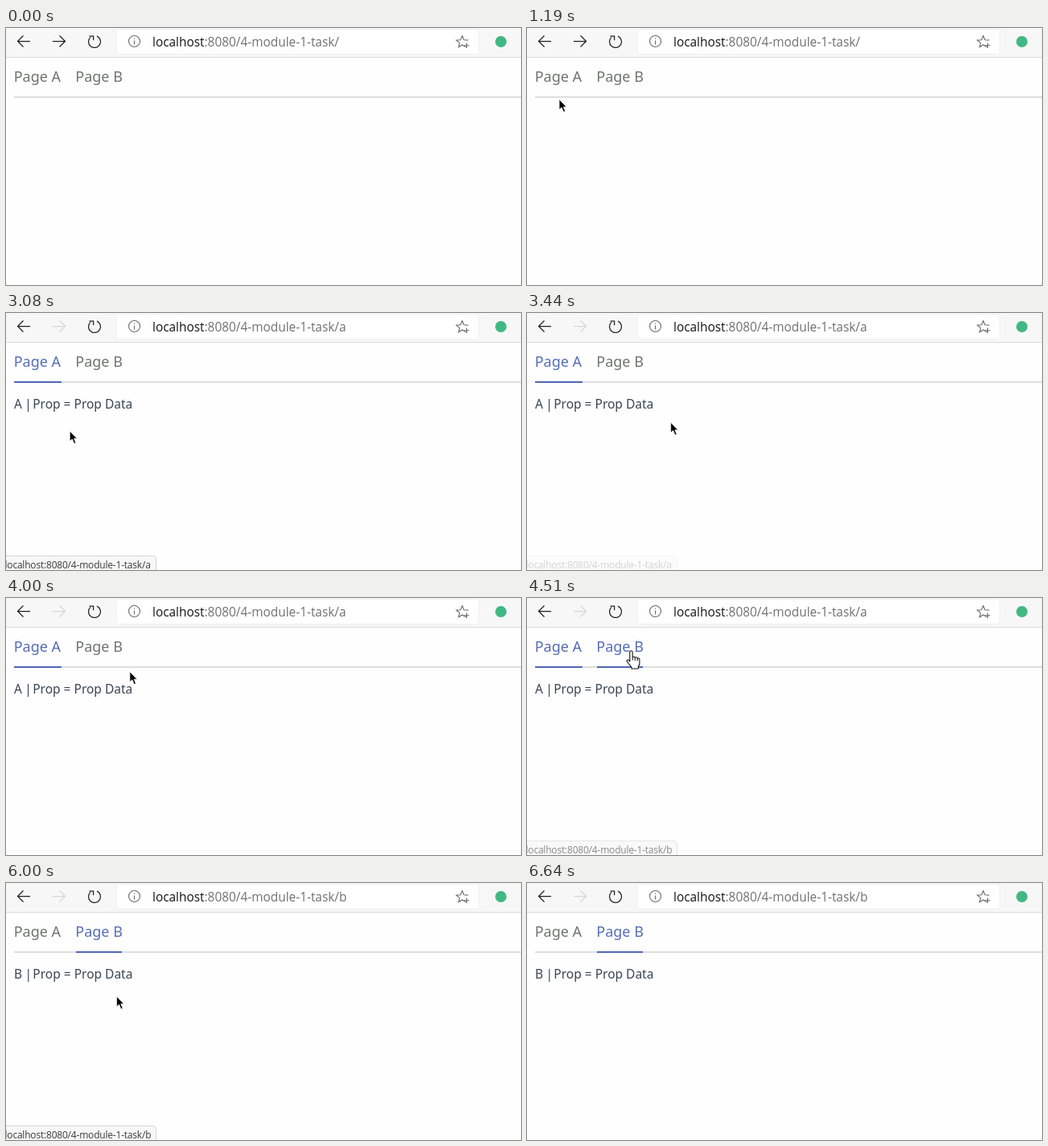
Animation, 640 px wide and 320 px high, one loop 8090 ms. Source, as an HTML page:

```html
<!DOCTYPE html>
<html lang="en">
<head>
<meta charset="utf-8">
<title>Page tabs</title>
<style>
  html, body { margin: 0; width: 100%; height: 100%; overflow: hidden; background: #fefefe; }
  svg { display: block; width: 100%; height: 100%; }
  text { white-space: pre; }
  .url { font: 15.4px "Open Sans", "Noto Sans", sans-serif; fill: #707070; }
  .host { fill: #151515; }
  .nav { font: 18px "Noto Sans", sans-serif; }
  .body { font: 15.5px "Noto Sans", sans-serif; fill: #3a4653; }
  .tip { font: 12px "Open Sans", "Noto Sans", sans-serif; letter-spacing: -.2px; fill: #3c3c3c; }
  .icon { fill: none; stroke: #222; stroke-width: 1.25; }
  .soft { stroke: #6a6a6a; stroke-width: 1.1; }
</style>
</head>
<body>
<svg viewBox="0 0 640 320">
  <rect width="640" height="320" fill="#fefefe"/>

  <!-- toolbar -->
  <rect width="640" height="37" fill="#f7f7f7"/>
  <rect y="36" width="640" height="1" fill="#dadada"/>
  <rect x="137.5" y="1.5" width="450" height="31" rx="3" fill="#fff" stroke="#f0f0f0"/>
  <path class="icon" d="M14.5 16.5H30M21.5 9.5L14.5 16.5L21.5 23.5"/>
  <path class="icon" id="forward" d="M58 16.5H73.5M66.5 9.5L73.5 16.5L66.5 23.5"/>
  <path class="icon" d="M113 10.1A7.5 7.5 0 1 1 105 11.4M103.5 10.2H108.6V15.2"/>
  <circle class="icon soft" cx="159.5" cy="16.5" r="7"/>
  <path class="icon soft" d="M159.5 15.5V20.5M159.5 12.5V13.8"/>
  <path class="icon soft" id="star"/>
  <path class="icon soft" d="M572.5 18.5V25M569.3 21.7H575.7"/>
  <circle cx="615" cy="17" r="7" fill="#41b883"/>
  <text class="url" x="182" y="23"><tspan class="host">localhost</tspan><tspan id="path"></tspan></text>

  <!-- page -->
  <rect x="10" y="85" width="630" height="2" fill="#dedee0"/>
  <text class="nav" id="linkA" x="9.7" y="67">Page A</text>
  <text class="nav" id="linkB" x="86.3" y="67">Page B</text>
  <rect id="lineA" x="10" y="85" width="59" height="2" fill="#4f68b4"/>
  <rect id="lineB" x="87" y="85" width="57" height="2" fill="#4f68b4"/>
  <text class="body" id="content" x="10" y="119"><tspan id="name"></tspan><tspan dx="-.7"> |</tspan><tspan dx="-2.6"> Prop = Prop Data</tspan></text>

  <g id="status">
    <rect x="-5.5" y="302.5" width="192" height="24" rx="4" fill="#f7f7f7" stroke="#d5d5d5"/>
    <text class="tip" id="tip" x="-1.5" y="318"></text>
  </g>

  <circle id="mark" r="11" fill="#fcf53c" opacity=".76"/>
  <g id="cursor">
    <path id="arrow" fill="#000" stroke="#fff" stroke-width=".7"
      d="M0 0V12.6L3 10L5.4 15.6L7.5 14.7L5.2 9.3H9Z"/>
    <path id="hand" fill="#fff" stroke="#111" stroke-width="1.15" stroke-linejoin="round"
      transform="translate(-.7 0) scale(.95)"
      d="M-1.8 2Q-1.8 0 0 0T1.8 2V8.2Q3.6 6.8 5 8.8Q6.9 7.6 8.2 9.8Q11 9 11 12V16.5Q11 18.5 9.3 20.5V23.5H.5V21.5L-5 14.8Q-6.3 12.6-4.8 12T-1.8 14ZM1.8 8.2V12.5M5 8.8V12.8M8.2 9.8V13.2"/>
  </g>
</svg>
<script>
const LOOP = 8090, OPEN_A = 1830, OPEN_B = 5400;
const BLUE = '#566eb6', GREY = '#707470';
const BASE = ':8080/4-module-1-task/';

// time, x, y, easing towards the next point
const moves = [
  [860, -4, 104, 'line'], [1190, 40, 89, 'out'], [1550, 51, 67.5, 'line'],
  [2700, 51, 67.5, 'in'], [3080, 79, 147, 'line'], [3270, 132, 148, 'line'],
  [3490, 192, 133, 'line'], [3540, 192, 133, 'in'], [4000, 154, 92, 'out'],
  [4280, 131, 66, 'line'], [4380, 131, 66, 'line'], [4610, 129.5, 65.5, 'line'],
  [5820, 129.5, 65.5, 'in'], [6230, 157, 324, 'line']
];
// time, opacity of the link hint
const hint = [
  [1680, 0], [1940, 1], [3300, 1], [3480, 0],
  [4380, 0], [4600, 1], [6460, 1], [6640, 0]
];
const ease = {
  line: p => p,
  in: p => Math.pow(p, 1.5),
  out: p => 1 - Math.pow(1 - p, 1.6)
};

const $ = id => document.getElementById(id);
const mix = (a, b, p) => a + (b - a) * p;
const show = (id, on) => $(id).setAttribute('visibility', on ? 'visible' : 'hidden');
const within = (t, from, to) => t >= from && t < to;

function sample(rows, t) {
  const i = rows.findIndex(r => r[0] > t);
  if (i === 0) return rows[0].slice(1);
  if (i < 0) return rows[rows.length - 1].slice(1);
  const a = rows[i - 1], b = rows[i];
  const p = ease[a[3] || 'line']((t - a[0]) / (b[0] - a[0]));
  return [1, 2].map(k => mix(a[k], b[k], p));
}

function drawStar() {
  const points = [];
  for (let i = 0; i < 9; i++) {
    const r = i % 2 ? 3.5 : 7.8, a = -Math.PI / 2 - (i - 2) * Math.PI / 5;
    points.push((567 + r * Math.cos(a)).toFixed(1) + ' ' + (17.5 + r * Math.sin(a)).toFixed(1));
  }
  $('star').setAttribute('d', 'M' + points.join('L'));
}

function setLink(name, on) {
  $('link' + name).setAttribute('fill', on ? BLUE : GREY);
  show('line' + name, on);
}

function draw(t) {
  const [x, y] = sample(moves, t);
  const visible = within(t, 860, 6230);
  const overLink = visible && within(y, 48, 87);
  const overA = overLink && within(x, 10, 69);
  const overB = overLink && within(x, 87, 144);
  const page = t < OPEN_A ? '' : t < OPEN_B ? 'a' : 'b';

  setLink('A', overA || page === 'a');
  setLink('B', overB || page === 'b');
  $('path').textContent = BASE + page;
  $('name').textContent = page.toUpperCase();
  show('content', page);
  $('forward').style.stroke = page ? '#d6d6d6' : '#222';

  $('tip').textContent = 'localhost' + BASE + (t < 4000 ? 'a' : 'b');
  $('status').setAttribute('opacity', sample(hint, t)[0]);

  $('cursor').setAttribute('transform', `translate(${x} ${y})`);
  show('arrow', visible && !overA && !overB);
  show('hand', overA || overB);

  show('mark', within(t, 1680, 1900) || within(t, 5250, 5480));
  $('mark').setAttribute('cx', x - .5);
  $('mark').setAttribute('cy', y);
}

drawStar();
const start = performance.now();
function tick() {
  draw((performance.now() - start) % LOOP);
  requestAnimationFrame(tick);
}
tick();
</script>
</body>
</html>
```
